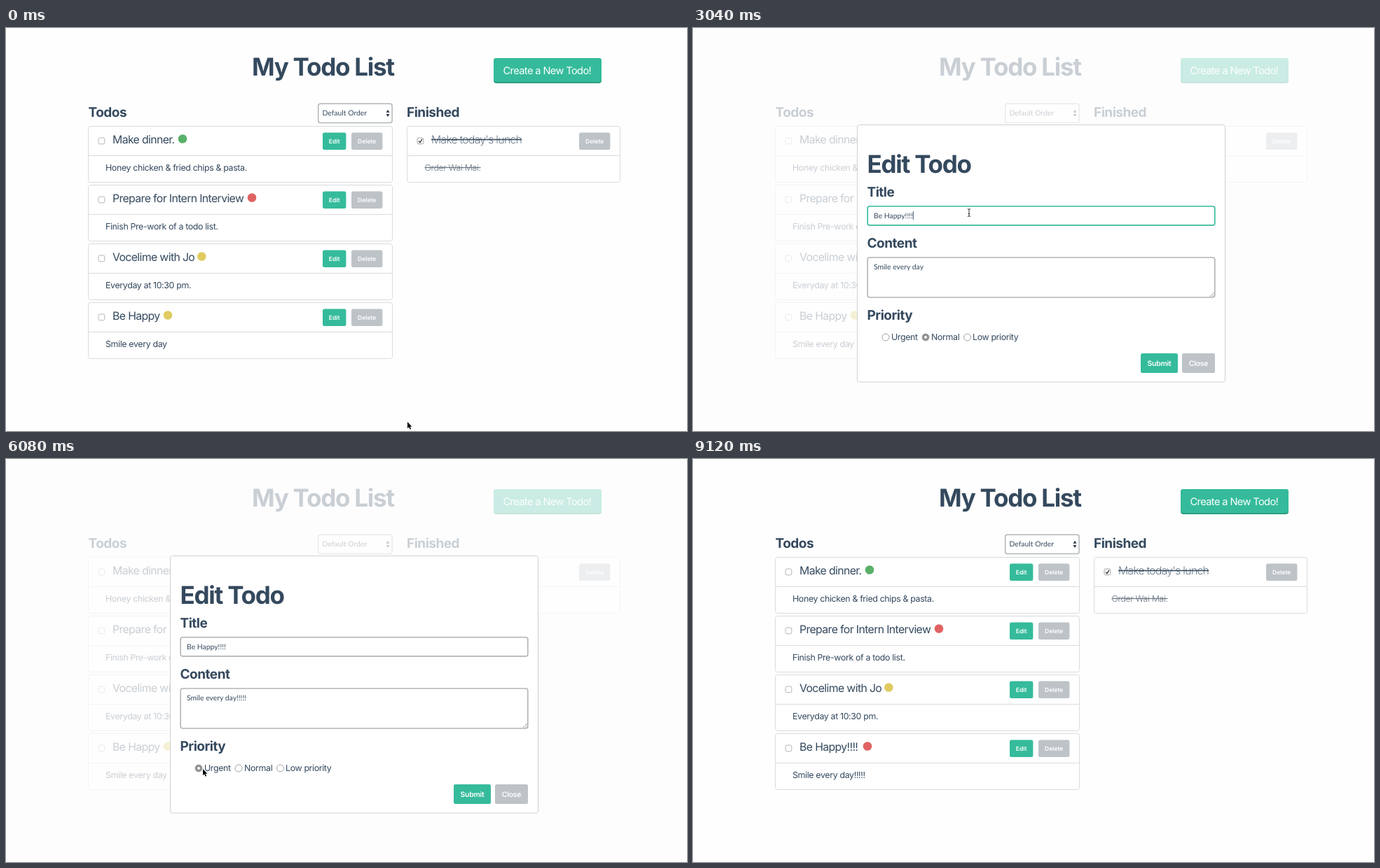
These frames come from a looping animation (972x576 px, 9.44 s). An HTML page:

```html
<!DOCTYPE html>
<html lang="en">
<head>
<meta charset="utf-8">
<title>My Todo List</title>
<style>
  html, body { margin: 0; width: 100%; height: 100%; overflow: hidden; background: #fefefe; }
  svg { position: absolute; left: 0; top: 0; display: block; }
  text {
    font-family: Inter, "Noto Sans", sans-serif;
    font-optical-sizing: none;
    text-rendering: geometricPrecision;
    fill: #34495e;
    white-space: pre;
  }
  .h1 { font-size: 35px; font-weight: 700; letter-spacing: -1.25px; }
  .h2 { font-size: 19px; font-weight: 700; letter-spacing: -.5px; }
  .name { font-size: 15.8px; letter-spacing: -.62px; }
  .body { font-size: 12.4px; letter-spacing: -.36px; }
  .big { font-size: 14.6px; letter-spacing: -.6px; fill: #fff; }
  .small { font-size: 8.5px; font-weight: 600; fill: #fff; }
  .mid { font-size: 10.4px; font-weight: 600; letter-spacing: -.2px; fill: #fff; }
  .field { font-family: Lato, "Open Sans", sans-serif; font-size: 10.4px; }
  .tip { font-size: 9px; font-weight: 600; fill: #fff; }
  .done { text-decoration: line-through; }
  .name.done { font-weight: 200; }
  .body.done { font-weight: 300; fill: #6c7986; }
  .middle { text-anchor: middle; }
</style>
</head>
<body>
<svg id="stage" width="972" height="576" viewBox="0 0 972 576"></svg>
<script>
const LOOP = 9440, STEP = 160;
const GREEN = '#35bb9b', GRAY = '#bdc3c7', LINE = '#d9dbde';
const RED = '#e06262', YELLOW = '#dfcb60', LEAF = '#59b069';

const text = (x, y, cls, str, id = '') =>
  `<text x="${x}" y="${y}" class="${cls}" id="${id}">${str.replace(/&/g, '&amp;')}</text>`;
const rect = (x, y, w, h, r, fill, more = '') =>
  `<rect x="${x}" y="${y}" width="${w}" height="${h}" rx="${r}" fill="${fill}" ${more}/>`;
const outline = (x, y, w, h, r, color, width = 1, id = '') =>
  rect(x, y, w, h, r, '#fff', `stroke="${color}" stroke-width="${width}" id="${id}"`);
const button = (x, y, w, h, label, fill, cls, base) =>
  rect(x, y, w, h, 2.5, fill) + text(x + w / 2, y + base, cls + ' middle', label);
const path = (d, more) => `<path d="${d}" ${more}/>`;

function card(x, y, w) {
  return outline(x, y, w, 80, 3, LINE) + path(`M${x} ${y + 42}h${w}`, `stroke="${LINE}"`);
}

function todo(row, name, body, dotX, color, ids = ['', '', '']) {
  const y = 140.5 + row * 84;
  return card(117.5, y, 434)
    + outline(132, y + 16.5, 8.8, 8.8, 2, '#b4b7ba')
    + text(152, y + 24, 'name', name, ids[0])
    + `<circle cx="${dotX}" cy="${y + 18}" r="6.3" fill="${color}" id="${ids[2]}"/>`
    + button(452, y + 9, 33.4, 24.5, 'Edit', GREEN, 'small', 15.4)
    + button(493, y + 9, 44.4, 24.5, 'Delete', GRAY, 'small', 15.4)
    + text(142, y + 63, 'body', body, ids[1]);
}

const page =
  text(351, 68, 'h1', 'My Todo List')
  + rect(696, 43, 154, 36, 4, '#2c9c80') + rect(696, 43, 154, 34, 4, GREEN)
  + text(709.5, 66.3, 'big', 'Create a New Todo!')
  + text(117.5, 127, 'h2', 'Todos') + text(572, 127, 'h2', 'Finished')
  + outline(445.7, 108.2, 105.4, 27.3, 3, '#b1b6bb', 1.5)
  + text(451.5, 125.4, 'field', 'Default Order')
  + path('M542.5 120.8l2.5-4 2.5 4zM542.5 123l2.5 4 2.5-4z', 'fill="#2b3846"')
  + todo(0, 'Make dinner.', 'Honey chicken & fried chips & pasta.', 252, LEAF)
  + todo(1, 'Prepare for Intern Interview', 'Finish Pre-work of a todo list.', 351, RED)
  + todo(2, 'Vocelime with Jo', 'Everyday at 10:30 pm.', 279.3, YELLOW)
  + todo(3, 'Be Happy', 'Smile every day', 231, YELLOW, ['lastName', 'lastBody', 'lastDot'])
  + card(572.5, 140.5, 304)
  + outline(587, 157, 8.8, 8.8, 2, '#a3a6a9')
  + path('M589 161.6l1.9 2.1 3-4.8', 'fill="none" stroke="#333" stroke-width="1.3"')
  + text(607, 164.5, 'name done', 'Make today\'s lunch')
  + text(597.5, 203.5, 'body done', 'Order Wai Mai.')
  + button(818, 149.5, 44.4, 24.5, 'Delete', GRAY, 'small', 15.4);

const radio = (x, label, labelX) =>
  `<circle cx="${x}" cy="442" r="5" stroke="#a2a2a2" class="radio"/>`
  + `<circle cx="${x}" cy="442" r="2" fill="#fff"/>`
  + text(labelX, 445.5, 'body', label);

const modal =
  outline(234.5, 138.5, 525, 367.5, 3, '#cfd1d3')
  + text(248.5, 207, 'h1', 'Edit Todo')
  + text(248.5, 240.5, 'h2', 'Title')
  + outline(249.2, 254.7, 495.6, 27.2, 3, '#b4b4b4', 1.6, 'titleBox')
  + text(258, 271.8, 'field', '', 'titleText')
  + text(248.5, 314, 'h2', 'Content')
  + outline(249.2, 328, 495.6, 57, 3, '#b4b4b4', 1.6, 'bodyBox')
  + path('M738 384l6-6M741.5 384l2.5-2.5', 'stroke="#888" stroke-width=".8"')
  + text(258, 345.2, 'field', '', 'bodyText')
  + text(248.5, 417, 'h2', 'Priority')
  + radio(275, 'Urgent', 283) + radio(332, 'Normal', 340) + radio(391.5, 'Low priority', 399)
  + button(639, 465, 53, 28, 'Submit', GREEN, 'mid', 17.9)
  + button(698, 465, 47, 28, 'Close', GRAY, 'mid', 17.9)
  + path('', 'stroke="#34495e" stroke-width=".9" id="caret"')
  + '<g id="popup"></g>';

const cursors = {
  arrow: path('M0 0V9.2L2.1 7.2 3.6 10.7 5.1 10 3.6 6.7H6.4Z',
    'stroke="#fff" stroke-width="1" paint-order="stroke"'),
  hand: path('M-1 6.5V.9Q-1 0 0 0T1 .9V4.4Q2.3 3.6 2.8 4.7 4 4.1 4.6 5.2 6.6 4.7 6.6 6.4 6.6 9 5.3 11H0Q-1.5 8.8-3.3 7.2-3.8 6-2.6 5.8-1.7 6-1 7Z',
    'fill="#fff" stroke="#222" stroke-width=".9"'),
  beam: path('M-2-5.5Q0-5.5 0-4V4Q0 5.5-2 5.5M2-5.5Q0-5.5 0-4M0 4Q0 5.5 2 5.5M-1.3 1.5H1.3',
    'fill="none" stroke="#333" stroke-width="1"')
};

// step, x, y, shape from here on
const track = [
  [0, 573, 563, 'arrow'], [5, 466, 412, 'hand'], [7, 466, 412, 'arrow'],
  [11, 394, 264, 'beam'], [20, 394, 264, 'beam'], [23, 396, 352, 'beam'],
  [32, 396, 352, 'arrow'], [36, 281, 443, 'arrow'], [38, 281, 443, 'arrow'],
  [39, 330, 460, 'arrow'], [42, 662, 479, 'hand'], [47, 662, 479, 'hand'],
  [49, 649, 480, 'arrow'], [51, 649, 480, 'arrow'], [52, 660, 440, 'arrow'],
  [54, 785, 148, 'arrow'], [56, 584, 560, 'arrow'], [57, 584, 600, 'arrow'],
  [59, 584, 600, 'arrow']
];

document.getElementById('stage').innerHTML =
  page + rect(0, 0, 972, 576, 0, '#fefefe', 'id="veil"')
  + `<g id="modal">${modal}</g><g id="cursor"></g>`;
const $ = id => document.getElementById(id);
const radios = document.querySelectorAll('.radio');

const ramp = (s, a, b) => Math.min(1, Math.max(0, (s - a) / (b - a)));
const mix = (a, b, k) => a + (b - a) * k;
const bangs = (s, steps) => '!'.repeat(steps.filter(n => s >= n).length);
const border = k => `rgb(${[[180, 53], [180, 187], [180, 155]].map(([a, b]) => Math.round(mix(a, b, k)))})`;

function drawCursor(s) {
  const i = track.findIndex((key, n) => n + 1 === track.length - 1 || s < track[n + 1][0]);
  const [s0, x0, y0, shape] = track[i], [s1, x1, y1] = track[i + 1];
  const k = ramp(s, s0, s1), e = k * k * (3 - 2 * k);
  $('cursor').innerHTML = cursors[shape];
  $('cursor').setAttribute('transform', `translate(${mix(x0, x1, e)} ${mix(y0, y1, e)})`);
}

function drawCaret(s) {
  const inTitle = s >= 12 && s < 23, inBody = s >= 23 && s < 37;
  if (!inTitle && !inBody) return $('caret').setAttribute('d', '');
  const x = 258.6 + $(inTitle ? 'titleText' : 'bodyText').getComputedTextLength();
  $('caret').setAttribute('d', `M${x} ${inTitle ? 262 : 335.5}v12`);
}

function drawPopup(s, title) {
  const items = s >= 13 && s < 20
    ? ['Be Happy', 'Be Happy!', 'Be Happy!!!'].filter(v => v.startsWith(title)) : [];
  $('popup').innerHTML = items.length
    ? rect(248.5, 284, 90.5, 10 + 25 * items.length, 2.5, '#292929')
      + items.map((v, i) => text(257, 304.8 + 25 * i, 'tip', v)).join('')
    : '';
}

function draw(s) {
  const saved = s >= 43;
  const title = 'Be Happy' + bangs(s, [15, 17, 18, 19]);
  const body = 'Smile every day' + bangs(s, [26, 27, 28, 29, 30]);

  $('lastName').textContent = saved ? title : 'Be Happy';
  $('lastBody').textContent = saved ? body : 'Smile every day';
  $('lastDot').setAttribute('cx', saved ? 249 : 231);
  $('lastDot').setAttribute('fill', saved ? RED : YELLOW);

  const open = ramp(s, 5, 7) - ramp(s, 42, 44);
  $('veil').setAttribute('opacity', .74 * open);
  $('modal').setAttribute('opacity', open);
  $('titleText').textContent = title;
  $('bodyText').textContent = body;
  $('titleBox').setAttribute('stroke', border(ramp(s, 11, 13) - ramp(s, 22, 25)));
  $('bodyBox').setAttribute('stroke', border(ramp(s, 22, 24) - ramp(s, 36, 38)));
  const picked = s < 37 ? 1 : 0;
  radios.forEach((r, i) => r.setAttribute('fill', i === picked ? '#8f8f8f' : '#fff'));

  drawCaret(s);
  drawPopup(s, title);
  drawCursor(s);
}

let last = -1;
function tick() {
  const s = Math.floor(performance.now() % LOOP / STEP);
  if (s !== last) draw(last = s);
  requestAnimationFrame(tick);
}
tick();
</script>
</body>
</html>
```
